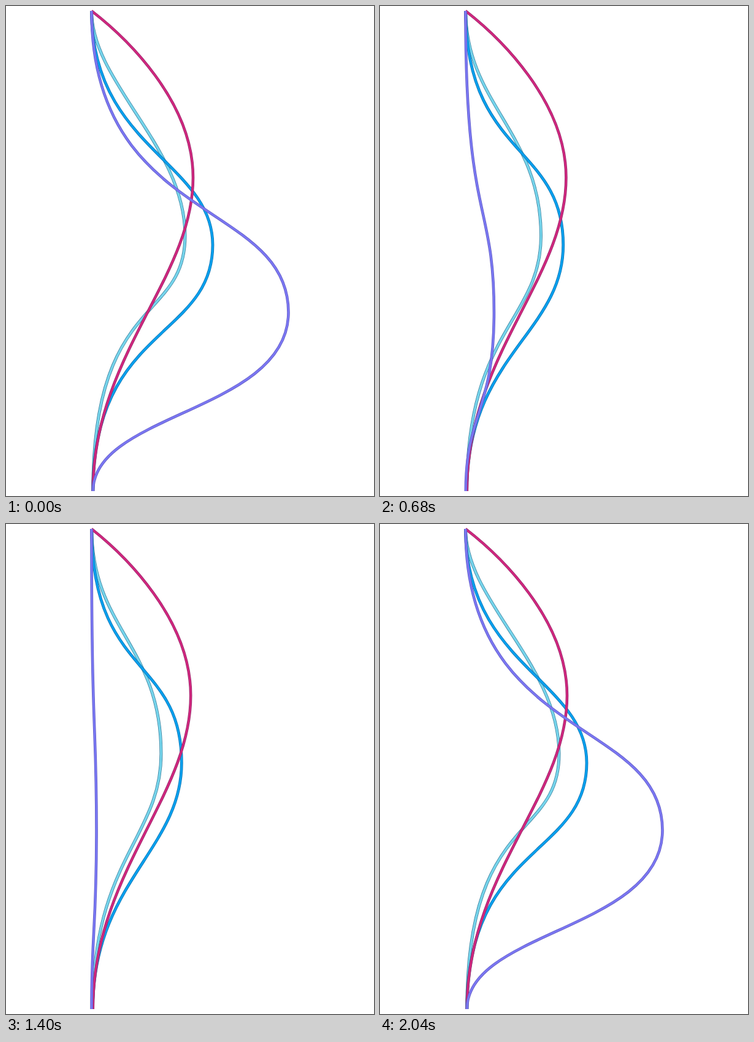
Recreate the animation shown at these times as an HTML page. Size 600x800 px, loop 2160 ms.

```html
<!DOCTYPE html>
<html lang="en">
<head>
<meta charset="utf-8">
<title>Plucked strings</title>
<style>
  html, body { margin: 0; width: 100%; height: 100%; overflow: hidden; background: #fff; }
  svg { display: block; width: 100vw; height: 100vh; }
  path { fill: none; }
</style>
</head>
<body>
<svg viewBox="0 0 600 800" xmlns="http://www.w3.org/2000/svg">
  <defs>
    <linearGradient id="violet" gradientUnits="userSpaceOnUse" x1="0" y1="8" x2="0" y2="792">
      <stop offset="0" stop-color="#7a76f2"/>
      <stop class="mid" offset=".3"/>
      <stop class="mid" offset=".8"/>
      <stop offset="1" stop-color="#7a76f2"/>
    </linearGradient>
  </defs>
</svg>
<script>
const STEP = 40, STEPS = 50, HOLD = 2;
const LOOP = STEP * (STEPS + 2 * HOLD);
const TOP = { x: 139.5, y: 8 }, BOTTOM = { x: 141.8, y: 792 };

// Handle heights that the two blue strings drift to as they straighten
const SLACK = [300, 110, 500, 766];

// peak: furthest point; lead: x of the first handle; handles: their heights
const strings = [
  { start: 5, span: 17, peak: [292, 375], lead: TOP.x, handles: [125, 230, 517, 470],
    slack: SLACK, core: '#76d5ec', edge: '#3a7f9c', width: 5, rest: 140.5 },
  { start: 5, span: 17, peak: [337, 390], lead: TOP.x, handles: [232, 255, 543, 523],
    slack: SLACK, core: '#08a0ee', edge: '#1273b0', width: 4.8, rest: 140.5 },
  { start: 13, span: 12.4, peak: [305, 280], lead: 195, handles: [51, 155, 445, 570],
    core: '#d0267e', edge: '#962c6c', width: 4.6, rest: 139.5 },
  { start: 0, span: 17, peak: [460.5, 500], lead: TOP.x, handles: [356, 316, 662, 664],
    core: 'url(#violet)', edge: '#625cc4', width: 4.6, rest: 139.5 }
];

const svg = document.querySelector('svg');
const mids = document.querySelectorAll('.mid');
const lerp = (a, b, p) => a + (b - a) * p;

function addPath(color, width) {
  const path = document.createElementNS(svg.namespaceURI, 'path');
  path.setAttribute('stroke', color);
  path.setAttribute('stroke-width', width);
  return svg.appendChild(path);
}

for (const s of strings) s.paths = [addPath(s.edge, s.width), addPath(s.core, s.width - 1.5)];

// Same curve as cubic-bezier(1, 0, .75, 1)
function ease(x) {
  if (x <= 0) return 0;
  if (x >= 1) return 1;
  let low = 0, high = 1;
  for (let i = 0; i < 24; i++) {
    const t = (low + high) / 2, r = 1 - t;
    if (3 * r * r * t + 2.25 * r * t * t + t ** 3 < x) low = t;
    else high = t;
  }
  return low * low * (3 - 2 * low);
}

function outline(s, p) {
  const base = lerp(TOP.x, s.rest, p);
  const at = x => (base + (x - TOP.x) * (1 - p)).toFixed(2);
  const [a, b, c, d] = s.handles.map((y, i) => s.slack ? lerp(y, s.slack[i], p) : y);
  const peakX = at(s.peak[0]), endX = at(BOTTOM.x);
  return `M${at(TOP.x)} ${TOP.y}C${at(s.lead)} ${a} ${peakX} ${b} ${peakX} ${s.peak[1]}` +
         `C${peakX} ${c} ${endX} ${d} ${endX} ${BOTTOM.y}`;
}

function draw(time) {
  const step = Math.floor(time % LOOP / STEP) - HOLD;
  const i = Math.max(0, Math.min(STEPS - 1, step));
  const k = Math.min(i, STEPS - 1 - i);   // there and back

  for (const s of strings) {
    s.p = ease((k - s.start) / s.span);
    const d = outline(s, s.p);
    for (const path of s.paths) path.setAttribute('d', d);
  }

  // The straight violet string takes on the blue beneath it
  const mix = strings[1].p ** 2;
  const color = `rgb(${lerp(122, 92, mix)},${lerp(118, 132, mix)},${lerp(242, 250, mix)})`;
  for (const stop of mids) stop.setAttribute('stop-color', color);
}

const start = performance.now();
function tick() {
  draw(performance.now() - start);
  requestAnimationFrame(tick);
}
tick();
</script>
</body>
</html>
```
